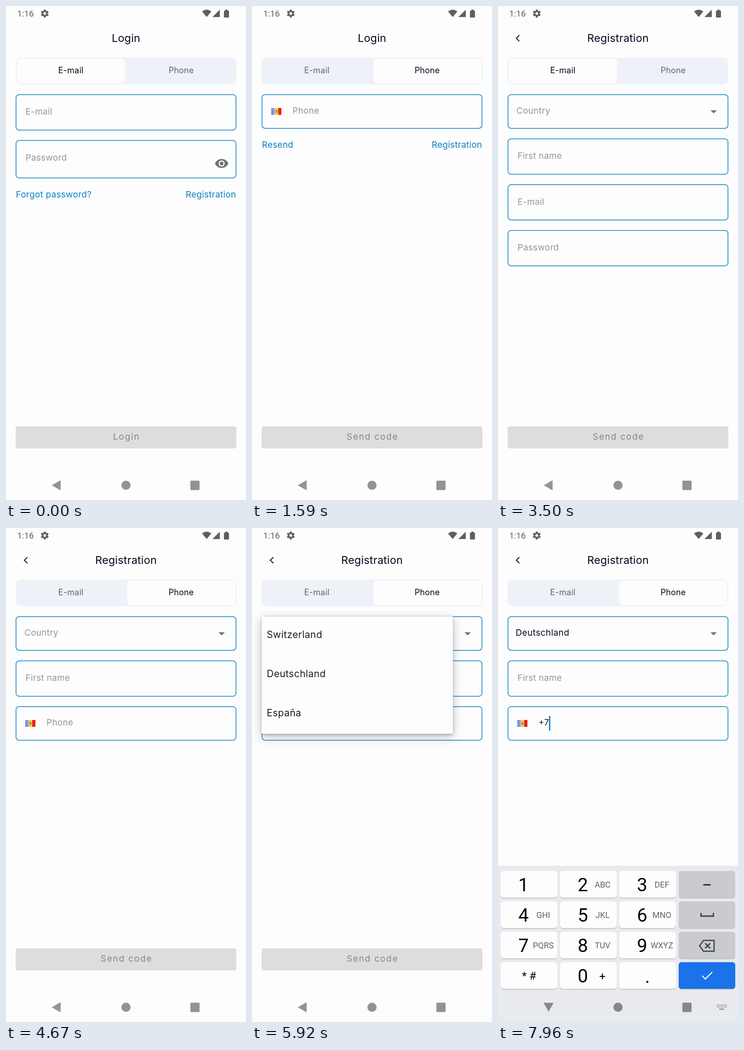
An HTML page with a canvas for the animation above (8 s loop, 522 by 1073 pixels).

```html
<!DOCTYPE html>
<html lang="en">
<head>
<meta charset="utf-8">
<title>Login and registration</title>
<style>
  html, body { margin: 0; width: 100%; height: 100%; overflow: hidden; background: #fdfdfd; }
  canvas { display: block; width: 522px; height: 1073px; }
</style>
</head>
<body>
<canvas id="stage" width="522" height="1073"></canvas>
<script>
const ctx = document.getElementById('stage').getContext('2d');
const W = 522, H = 1073, LOOP = 8000;
const UI = 'Inter, sans-serif', SYS = 'Roboto, sans-serif';
const PAPER = '#fdfdfd', INK = '#080820', BLUE = '#0a80c2', HINT = '#969698', ICON = '#5f5f62';

// Moments of the story, in ms
const T = { loginTab: 1080, route: 2480, regTab: 4140, menuOpen: 4800,
            pick: 5980, focus: 6540, keys: 7040, press: 7540, typed: 7640 };

const clamp = v => Math.max(0, Math.min(1, v));
const span = (t, start, length) => clamp((t - start) / length);
const ease = p => p * p * (3 - 2 * p);
const easeOut = p => 1 - (1 - p) ** 3;

function faded(alpha, paint) {
  ctx.save();
  ctx.globalAlpha *= alpha;
  paint();
  ctx.restore();
}

function text(str, x, y, size, color, { align = 'left', font = UI, gap = 0.25, weight = 400 } = {}) {
  ctx.font = `${weight} ${size}px ${font}`;
  ctx.letterSpacing = gap + 'px';
  ctx.textAlign = align;
  ctx.fillStyle = color;
  ctx.fillText(str, x, y);
}

function box(x, y, w, h, r, color) {
  ctx.beginPath();
  ctx.roundRect(x, y, w, h, r);
  ctx.fillStyle = color;
  ctx.fill();
}

function disc(x, y, r, color) {
  ctx.beginPath();
  ctx.arc(x, y, r, 0, Math.PI * 2);
  ctx.fillStyle = color;
  ctx.fill();
}

function trace(points) {
  ctx.beginPath();
  points.forEach(([x, y]) => ctx.lineTo(x, y));
}

function shape(points, color) {
  trace(points);
  ctx.closePath();
  ctx.fillStyle = color;
  ctx.fill();
}

function line(points, color, width, closed) {
  trace(points);
  if (closed) ctx.closePath();
  ctx.strokeStyle = color;
  ctx.lineWidth = width;
  ctx.stroke();
}

function field(top, bottom, hint, x, base) {
  ctx.beginPath();
  ctx.roundRect(21.75, top, 478.5, bottom - top, 7);
  ctx.strokeStyle = BLUE;
  ctx.lineWidth = 1.5;
  ctx.stroke();
  if (hint) text(hint, x, base, 19, HINT);
}

function flag(y) {
  const blue = ctx.createLinearGradient(42, 0, 50, 0);
  blue.addColorStop(0, '#6680e8');
  blue.addColorStop(1, '#a3aced');
  box(42, y, 8, 15, 0, blue);
  box(49.5, y, 7.5, 15, 0, '#f6d33c');
  box(57, y, 7, 15, 0, '#e8231f');
  box(51, y + 4, 4.5, 7, 2, '#b88c43');
}

function statusBar() {
  text('1:16', 24.5, 23, 18.6, ICON, { font: SYS, gap: 0 });

  ctx.save();
  ctx.translate(84.3, 16.3);
  for (let i = 0; i < 6; i++) {
    ctx.rotate(Math.PI / 3);
    box(-2.3, -8.6, 4.6, 6, 1, ICON);
  }
  disc(0, 0, 6.3, ICON);
  disc(0, 0, 3, PAPER);
  ctx.restore();

  ctx.beginPath();
  ctx.moveTo(436.5, 24);
  ctx.lineTo(426.5, 12);
  ctx.quadraticCurveTo(436.5, 4, 446.5, 12);
  ctx.closePath();
  ctx.fillStyle = ICON;
  ctx.fill();
  shape([[449, 24], [465, 24], [465, 8]], ICON);
  box(474, 10, 11, 15, 1.5, ICON);
  box(477, 8, 5, 3, 0, ICON);
}

function tabs(p) {
  const tint = on => `rgb(${[[100, 8], [100, 8], [104, 32]].map(([a, b]) => Math.round(a + (b - a) * on))})`;
  box(21, 112, 480, 58, 12, '#eff1f9');
  box(23.5 + 240 * p, 114, 235.5, 54, 9, PAPER);
  text('E-mail', 141, 146, 18, tint(1 - p), { align: 'center' });
  text('Phone', 381, 146, 18, tint(p), { align: 'center', gap: 0.1 });
}

function title(str) {
  text(str, 261, 78, 23.4, INK, { align: 'center', gap: 0.2 });
}

function button(label) {
  box(21, 913, 480, 48, 4, '#dddde0');
  text(label, 262, 942, 19, '#858588', { align: 'center', gap: 1.8 });
}

function links(left, base) {
  text(left, 21.5, base, 19, BLUE);
  text('Registration', 500.5, base, 19, BLUE, { align: 'right' });
}

function eye(x, y) {
  ctx.beginPath();
  ctx.moveTo(x - 14.5, y);
  ctx.bezierCurveTo(x - 9, y - 13, x + 9, y - 13, x + 14.5, y);
  ctx.bezierCurveTo(x + 9, y + 13, x - 9, y + 13, x - 14.5, y);
  ctx.fillStyle = '#717174';
  ctx.fill();
  disc(x, y, 6.6, PAPER);
  disc(x, y, 4, '#717174');
}

function loginPage(t) {
  title('Login');
  tabs(ease(span(t, T.loginTab, 260)));
  if (t < T.loginTab + 80) {
    field(192.5, 269.5, 'E-mail', 42.5, 236);
    field(292, 373.5, 'Password', 42.5, 335.5);
    eye(469, 342);
    links('Forgot password?', 416);
    button('Login');
  } else {
    field(192.5, 265.7, 'Phone', 88, 233.5);
    flag(221.5);
    links('Resend', 308);
    button('Send code');
  }
}

function phoneField(t) {
  const typed = t >= T.typed;
  field(388, 461, typed ? '' : 'Phone', 88, 429);
  flag(417);
  if (typed) text('+7', 88, 429, 19, '#222226', { gap: 0 });
  const blink = Math.floor((t - T.focus) / 500) % 2 === 0;
  if (t >= T.focus && (t < T.keys || typed || blink)) box(typed ? 111 : 88, 408, 2.7, 32, 0, BLUE);
}

function registerPage(t) {
  line([[46.5, 63.5], [39.8, 70], [46.5, 76.5]], '#18181c', 2);
  title('Registration');
  tabs(ease(span(t, T.regTab, 260)));

  const chosen = t >= T.pick;
  field(192.5, 265.7);
  if (chosen) text('Deutschland', 38.5, 234, 19, INK, { gap: 0.4 });
  else text('Country', 40, 234, 19, HINT);
  shape([[462, 226.5], [476, 226.5], [469, 233.2]], '#727274');

  field(288.5, 365.5, 'First name', 42.5, 332);
  if (t < T.regTab + 80) {
    field(388, 464.8, 'E-mail', 42.5, 431.5);
    field(487.5, 564.5, 'Password', 42.5, 531);
  } else phoneField(t);
  button('Send code');
}

function menu(t) {
  const p = span(t, T.menuOpen, 300);
  const alpha = clamp(p * 4) * (1 - span(t, T.pick, 160));
  if (!alpha) return;
  const h = 85 + 170 * ease(clamp((p - 0.25) * 4));
  faded(alpha, () => {
    ctx.save();
    ctx.shadowColor = 'rgba(40,40,60,0.28)';
    ctx.shadowBlur = 22;
    ctx.shadowOffsetY = 7;
    box(21, 192, 416, h, 2, PAPER);
    ctx.shadowBlur = 5;
    ctx.shadowOffsetY = 2;
    box(21, 192, 416, h, 2, PAPER);
    ctx.restore();
    ['Switzerland', 'Deutschland', 'España'].forEach((name, i) =>
      faded(clamp((p - 0.4 - i * 0.12) * 3), () =>
        text(name, 32, 239 + i * 85.2, 21, '#202024', { gap: 0.4 })));
  });
}

function keyIcons() {
  const dark = '#3c4043';
  box(446.5, 773.7, 16, 2.7, 0, '#17181a');
  line([[441.5, 836], [441.5, 843], [468.5, 843], [468.5, 836]], dark, 2.8);
  line([[438.5, 907.5], [447, 895.8], [470, 895.8], [470, 919.2], [447, 919.2]], dark, 2.6, true);
  line([[450.5, 902], [461.5, 913]], dark, 2.6);
  line([[461.5, 902], [450.5, 913]], dark, 2.6);
  line([[444, 972.5], [451, 979.5], [466, 964.5]], '#fff', 2.3);
}

function keyboard(t) {
  const p = easeOut(span(t, T.keys, 250));
  if (!p) return;
  ctx.save();
  ctx.translate(0, (1 - p) * (H - 736));
  const edge = ctx.createLinearGradient(0, 732, 0, 737);
  edge.addColorStop(0, 'rgba(220,222,226,0)');
  edge.addColorStop(1, '#dfe1e5');
  box(0, 732, W, 5, 0, edge);
  box(0, 736.5, W, H - 736, 0, '#e8eaed');

  const letters = ['', 'ABC', 'DEF', 'GHI', 'JKL', 'MNO', 'PQRS', 'TUV', 'WXYZ'];
  const mid = { align: 'center', font: SYS, gap: 0 };
  for (let row = 0; row < 4; row++) {
    const y = 745 + row * 66;
    for (let col = 0; col < 4; col++) {
      const x = 6 + col * 129, n = row * 3 + col;
      const down = row === 2 && col === 0 && t >= T.press && t < T.press + 130;
      const color = col === 3 ? (row === 3 ? '#1a73e8' : '#c9cbcf') : down ? '#d5d7da' : '#fdfdfd';
      box(x, y + 1.5, 123, 58, 6, '#b9bbbf');
      box(x, y, 123, 58, 6, color);
      if (col < 3 && row < 3) {
        text(n + 1, x + 49.5, y + 44, 40, '#000', mid);
        text(letters[n], x + 92.5, y + 36, 18, '#5f6368', mid);
      }
    }
  }
  text('* #', 67.5, 981, 23.5, '#000', mid);
  text('0', 184.5, 987, 40, '#000', mid);
  text('+', 227, 981.5, 24, '#000', mid);
  text('.', 325, 988, 40, '#000', mid);
  keyIcons();
  ctx.restore();
}

function navBar(t) {
  const gray = 'rgba(0,0,0,0.42)';
  const turn = ease(span(t, T.keys, 200));
  ctx.save();
  ctx.translate(110, 1041 - turn);
  ctx.rotate(-Math.PI / 2 * turn);
  ctx.beginPath();
  ctx.moveTo(-10.5, 0);
  ctx.arcTo(8.8, -11, 8.8, 11, 1);
  ctx.arcTo(8.8, 11, -10.5, 0, 1);
  ctx.closePath();
  ctx.fillStyle = gray;
  ctx.fill();
  ctx.restore();

  disc(261, 1041, 10, gray);
  box(401, 1031, 20, 20.5, 2, gray);
  if (t < T.focus + 200) return;
  for (let row = 0; row < 2; row++)
    for (let col = 0; col < 6; col++)
      box(476 + col * 3.8, 1035 + row * 4, 2.2, 2.2, 0, gray);
  box(481, 1043.8, 11, 2.4, 0, gray);
}

function draw(t) {
  box(0, 0, W, H, 0, PAPER);
  const route = ease(span(t, T.route, 260));
  if (route < 1) loginPage(t);
  if (route > 0) faded(route, () => {
    box(0, 0, W, H, 0, PAPER);
    registerPage(t);
  });
  menu(t);
  keyboard(t);
  statusBar();
  navBar(t);
}

function tick() {
  draw(performance.now() % LOOP);
  requestAnimationFrame(tick);
}
tick();
</script>
</body>
</html>
```
